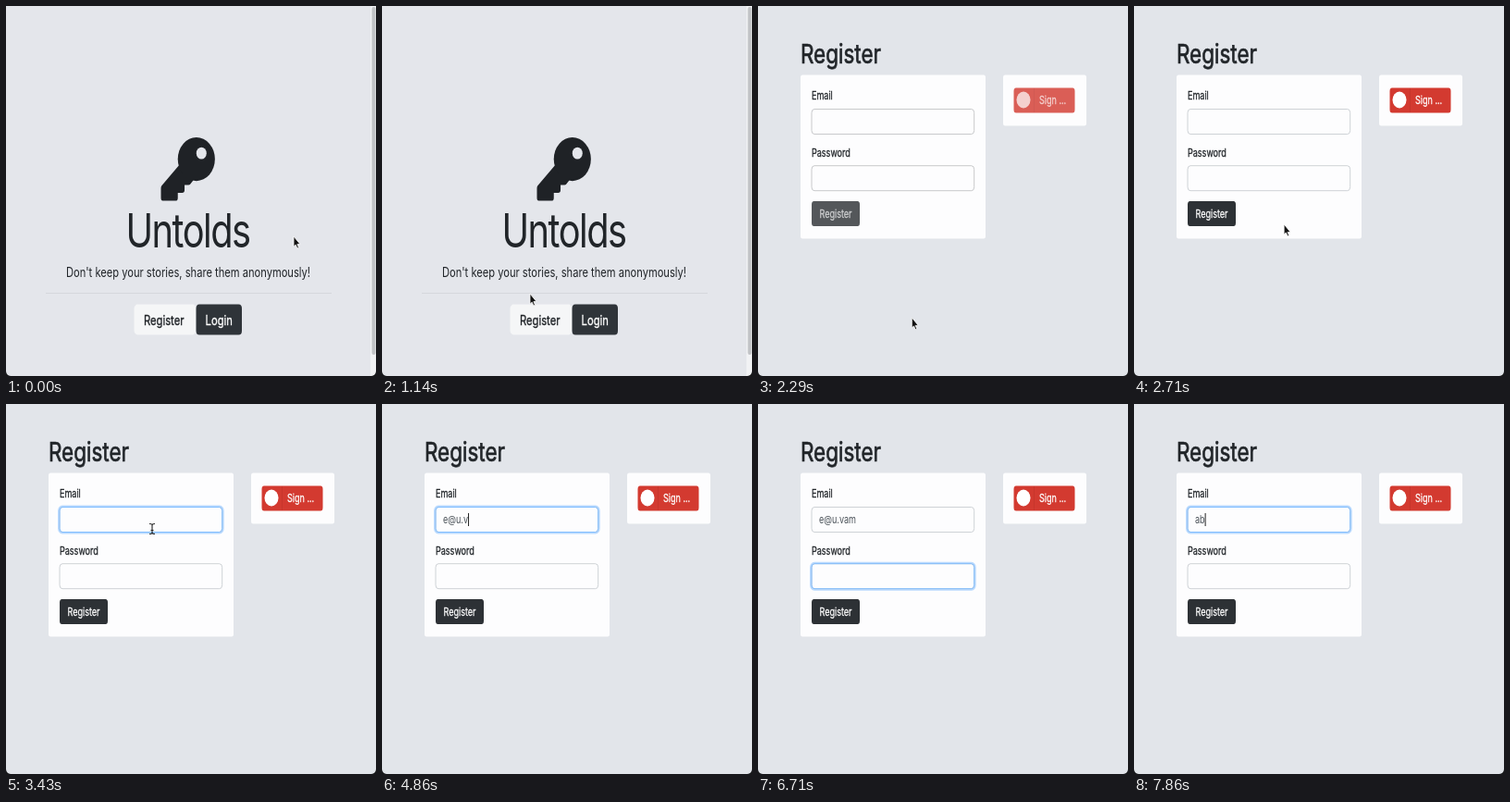
An HTML page that plays this animation: 400 px wide and 400 px high, repeating every 8 s.

```html
<!DOCTYPE html>
<html lang="en">
<head>
<meta charset="utf-8">
<title>Sign-up demo</title>
<style>
  html, body { margin: 0; width: 100%; height: 100%; overflow: hidden; background: #e3e5ea; }
  svg { display: block; width: 100%; height: 100%; }
  text { font-family: Inter, Roboto, sans-serif; fill: #212529; }
  .mid { text-anchor: middle; }
  .firm { stroke: #212529; stroke-width: .025em; }
  .light { fill: #fff; }
  .light.firm { stroke: #fff; }
  .typed { fill: #495057; }
  .card { fill: #fdfdfe; }
  .dim { opacity: .81; }
  .dim .light { opacity: .72; }
</style>
</head>
<body>
<svg viewBox="0 0 400 400" preserveAspectRatio="none">
  <g id="home">
    <rect width="400" height="400" fill="#e4e6eb"/>
    <rect x="394" width="6" height="400" fill="#f1f2f4"/>
    <rect x="395.5" y="1" width="4" height="376" rx="2" fill="#c1c3c6"/>
    <g transform="translate(167.5 142) scale(.114 .134)" fill="#1f2226">
      <path d="M169 227 7 389Q0 396 0 410V488Q0 512 24 512H136Q160 512 160 488V448H200Q224 448 224 424V384H261Q272 384 279 376L340 310Z"/>
      <circle cx="336" cy="176" r="176"/>
      <circle cx="384" cy="128" r="48" fill="#e4e6eb"/>
    </g>
    <g id="homeText"></g>
    <path d="M43 310.5H352" stroke="#d5d7dc"/>
    <rect id="join" x="138.5" y="322.5" width="67" height="33" rx="4" ry="5"/>
    <rect x="205.5" y="322.5" width="49.5" height="33" rx="3.5" ry="4.5" fill="#2f3439"/>
    <g id="homeButtons"></g>
    <g id="status">
      <path d="M0 389H67Q71 389 71 393V400H0Z" fill="#66686c"/>
    </g>
  </g>

  <g id="form">
    <rect width="400" height="400" fill="#e2e5ea"/>
    <rect class="card" x="46" y="74.5" width="200" height="177" rx="2.5"/>
    <rect class="card" x="265" y="74.5" width="90" height="55" rx="2.5"/>
    <g id="labels"></g>
    <g id="fields"></g>
    <rect id="mark" x="66" y="118" height="14" fill="#b3d7ff"/>
    <g id="entry"></g>
    <rect id="caret" width="1" height="14" fill="#222"/>
    <g id="buttons">
      <rect x="58" y="211" width="52" height="27" rx="2.5" ry="3.5" fill="#2d3135"/>
      <rect x="276.5" y="88.5" width="66" height="27" rx="2.5" ry="3.5" fill="#d33a30"/>
      <path d="M298.5 89V115" stroke="#c2342b" stroke-width=".7"/>
      <ellipse class="light" cx="287" cy="101.5" rx="7.5" ry="9"/>
    </g>
  </g>

  <path id="arrow" d="M0 0V11.2L2.2 9.2 3.9 13 5.5 12.2 3.9 8.6H7Z" fill="#111" stroke="#fff" stroke-width=".8"/>
  <path id="beam" d="M-3-5.5Q0-5.5 0-4Q0-5.5 3-5.5M0-4V4M-3 5.5Q0 5.5 0 4Q0 5.5 3 5.5M-1.5 1.5H1.5" fill="none" stroke="#222" stroke-width="1.1"/>
  <path d="M0 395Q.5 399.5 5 400H0ZM400 395Q399.5 399.5 395 400H400Z" fill="#17181a"/>
</svg>
<script>
const LOOP = 8000, STEP = 1000 / 7, STEPS = 56;
const SQUEEZE = 0.78; // the recorded page is narrowed to a square
const MAIL = "e@u.vam";
const $ = id => document.getElementById(id);

function make(parent, tag, attrs) {
  const el = document.createElementNS("http://www.w3.org/2000/svg", tag);
  for (const k in attrs) el.setAttribute(k, attrs[k]);
  return $(parent).appendChild(el);
}

function label(parent, str, x, y, size, cls = "", extra = {}) {
  const el = make(parent, "text", {
    transform: `translate(${x} ${y}) scale(${SQUEEZE} 1)`,
    "font-size": size, class: cls, ...extra
  });
  el.textContent = str;
  return el;
}

label("homeText", "Untolds", 196.5, 261, 51, "mid", { "letter-spacing": "-.038em" });
label("homeText", "Don't keep your stories, share them anonymously!", 197, 293.3, 14.3, "mid");
label("homeButtons", "Register", 170.7, 344.5, 14.4, "mid firm");
label("homeButtons", "Login", 230.2, 344.5, 14.4, "mid light firm");
label("status", "demoboxes:4170/newentry", 2.5, 397.3, 6.8, "", { style: "fill:#dcdde0" });
label("labels", "Register", 46, 62, 28.8, "firm");
label("labels", "Email", 58, 101, 11.6, "firm");
label("labels", "Password", 58, 162.6, 11.6, "firm");
label("buttons", "Register", 84, 228.6, 11.6, "mid light firm");
label("buttons", "Sign ...", 304, 106, 11.6, "light firm");
const entry = label("entry", "", 66, 129, 11.6, "typed");

function field(y) {
  const box = { x: 58, y, width: 175.7, height: 27, rx: 3, ry: 4 };
  const glow = make("fields", "rect", { ...box, fill: "none", stroke: "#007bff", "stroke-opacity": .27, "stroke-width": 4 });
  const rim = make("fields", "rect", { ...box, fill: "#fdfdfe", stroke: "#ced2d6" });
  const lit = make("fields", "rect", { ...box, fill: "none", stroke: "#80bdff" });
  return { rim, focus(v) { glow.style.opacity = lit.style.opacity = v; } };
}
const mail = field(111.5), pass = field(172.7);

const show = (el, on) => { el.style.display = on ? "" : "none"; };
const clamp = v => Math.min(1, Math.max(0, v));
const smooth = v => v * v * (3 - 2 * v);

// step, x, y of the pointer
const PATH = [[0, 311, 249], [8, 160, 311], [13, 166.3, 336.8], [16, 166.3, 336.8], [22, 158, 135], [STEPS, 158, 135]];
function pointer(n) {
  const i = PATH.findIndex(p => p[0] > n);
  const [a, b] = [PATH[i - 1], PATH[i]];
  const k = smooth((n - a[0]) / (b[0] - a[0]));
  return [a[1] + (b[1] - a[1]) * k, a[2] + (b[2] - a[2]) * k];
}

const KEYS = [27, 30, 32, 33, 34, 35, 36];
function typed(n) {
  if (n >= 52) return n >= 55 ? "ab" : "a";
  return MAIL.slice(0, KEYS.filter(k => n >= k).length);
}

function blink(n) {
  if (n === 40 || n === 44) return .5;
  return n < 40 || n === 45 || n === 46 ? 1 : 0;
}

function draw(t) {
  const n = Math.floor((t + 5) / STEP) % STEPS;
  const home = n < 16;
  show($("home"), home);
  show($("form"), !home);

  const [x, y] = pointer(n);
  const text = !home && y > 111 && y < 139;
  show($("arrow"), !text);
  show($("beam"), text && n < 27);
  $("arrow").setAttribute("transform", `translate(${x} ${y})`);
  $("beam").setAttribute("transform", `translate(${x} ${y})`);

  if (home) {
    const hover = clamp((n - 8) / 2);
    $("join").setAttribute("fill", hover === 1 ? "#e1e2e5" : hover ? "#ebecef" : "#f5f6f7");
    show($("status"), n >= 11);
    return;
  }

  const fresh = n === 16;
  $("buttons").classList.toggle("dim", fresh);
  for (const f of [mail, pass]) f.rim.setAttribute("stroke", fresh ? "#c8c9cb" : "#ced2d6");

  const toPass = clamp((n - 36) / 2), back = clamp((n - 48) / 2);
  mail.focus(clamp((n - 22) / 2) - toPass + back);
  pass.focus(toPass - back);

  entry.textContent = typed(n);
  const width = entry.getComputedTextLength() * SQUEEZE;
  const marked = n >= 49 && n < 52;
  show($("mark"), marked);
  $("mark").setAttribute("width", width);

  const inPass = n >= 37 && n < 49;
  const caret = $("caret");
  caret.setAttribute("x", inPass ? 65.5 : 66 + width);
  caret.setAttribute("y", inPass ? 179 : 118);
  caret.style.opacity = n < 27 || marked ? 0 : inPass ? blink(n) : 1;
}

const start = performance.now();
function tick() {
  draw((performance.now() - start) % LOOP);
  requestAnimationFrame(tick);
}
tick();
</script>
</body>
</html>
```
